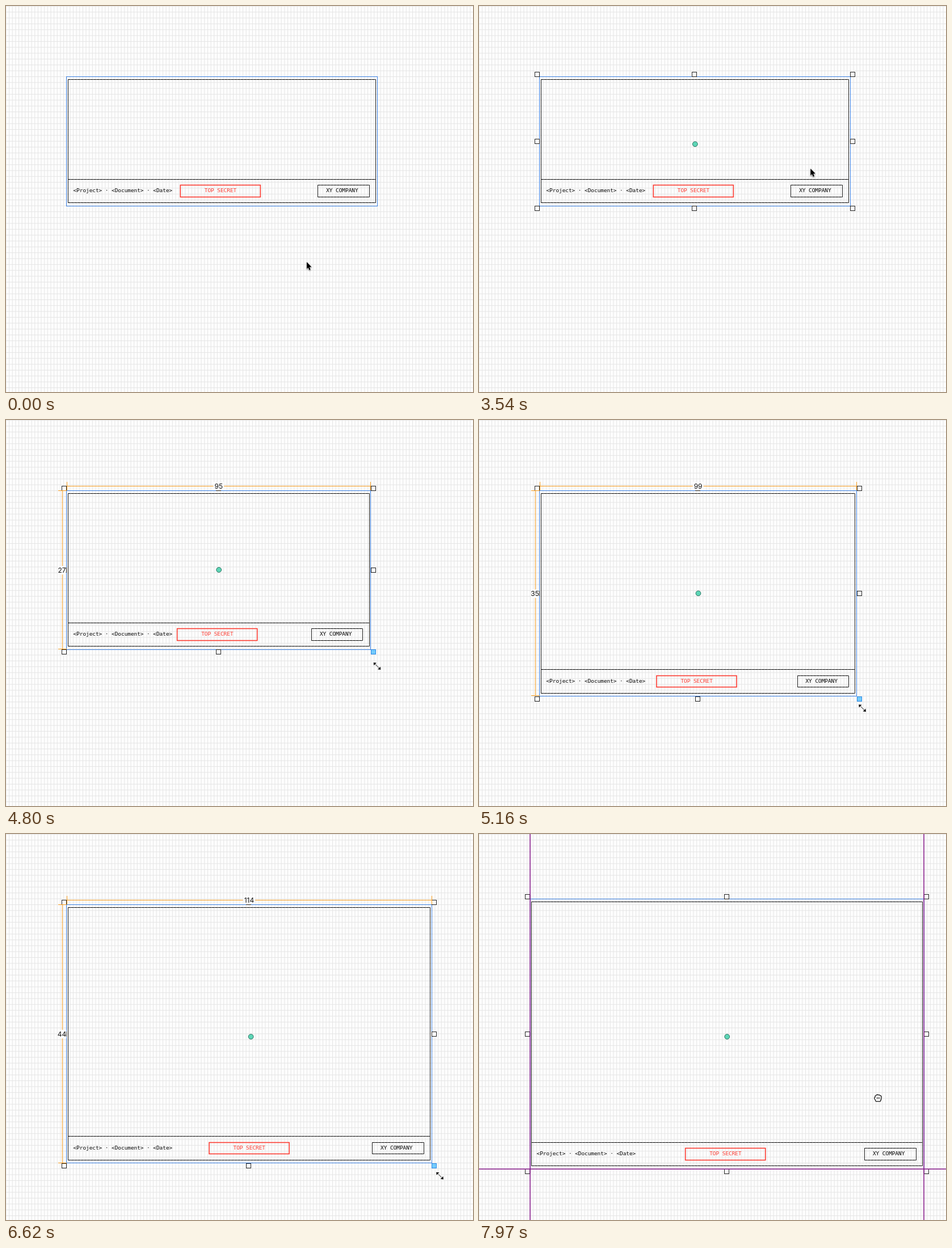
An HTML page with a canvas that plays this animation: 823x680 px, repeating every 8000 ms.

```html
<!DOCTYPE html>
<html lang="en">
<head>
<meta charset="utf-8">
<title>Resizing a text frame</title>
<style>
html, body { margin: 0; width: 100%; height: 100%; overflow: hidden; background: #fdfdfd; }
canvas { display: block; width: 823px; height: 680px; }
</style>
</head>
<body>
<canvas id="stage" width="823" height="680"></canvas>
<script>
const ctx = document.getElementById('stage').getContext('2d');
const WIDTH = 823, HEIGHT = 680, LOOP = 8000;
const CW = 5.642, CH = 10.34;
const HOME = { col: 19, row: 12, cols: 97, rows: 22 };
const BLUE = '#3a7fe0', ORANGE = '#f59a1c', RED = '#fb3a30', PURPLE = '#86188a';

// Moments in ms at which the interaction changes
const SELECT = 2830, HOVER = 3990, HOT = 4140, PRESS = 4350;
const RELEASE = 7360, LEAVE = 7400, GRAB = 7880;
const LAG = 100;

// Pointer moves: start, end, destination; it rests in between
const moves = [
  [0, 0, 529.5, 450], [500, 970, 489.5, 251], [2240, 2320, 503, 239.3],
  [2320, 2500, 515, 219.5], [3130, 3930, 649, 348], [3930, 3990, 657, 357],
  [PRESS, 4500, 636, 371.5], [4500, 5160, 675.5, 507.5], [5160, 5680, 719.5, 518],
  [5880, 6520, 754, 585], [6520, 6620, 764.5, 602], [6620, 7060, 806, 610],
  [RELEASE, 7730, 720, 475], [7850, 7970, 703, 465]
];

function pointerAt(t) {
  let x = 0, y = 0;
  for (const [from, to, toX, toY] of moves) {
    if (t < from) break;
    const p = Math.min(1, (t - from) / (to - from || 1));
    if (to === from) [x, y] = [toX, toY];
    else { x += (toX - x) * p; y += (toY - y) * p; }
  }
  return { x, y };
}

// Whole cells between two pointer positions
function cellsBetween(a, b) {
  return { x: Math.round((b.x - a.x - 0.5) / CW), y: Math.round((b.y - a.y) / CH) };
}

// The frame follows the corner drag with a short lag, then the body drag
function frameAt(t) {
  const pulled = cellsBetween(pointerAt(PRESS), pointerAt(Math.min(t, RELEASE) - LAG));
  const shift = t < GRAB ? { x: 0, y: 0 } : cellsBetween(pointerAt(7800), pointerAt(t));
  const resized = t >= PRESS;
  return {
    col: HOME.col + shift.x,
    row: HOME.row + shift.y,
    cols: HOME.cols + (resized ? pulled.x : 0),
    rows: HOME.rows + (resized ? pulled.y : 0)
  };
}

const pixel = v => Math.floor(v) + 0.5;

function line(x1, y1, x2, y2, color, width = 1) {
  ctx.strokeStyle = color;
  ctx.lineWidth = width;
  ctx.beginPath();
  ctx.moveTo(x1, y1);
  ctx.lineTo(x2, y2);
  ctx.stroke();
}

function polygon(points) {
  ctx.beginPath();
  points.forEach(([x, y]) => ctx.lineTo(x, y));
  ctx.closePath();
}

function drawGrid() {
  ctx.fillStyle = '#fdfdfd';
  ctx.fillRect(0, 0, WIDTH, HEIGHT);
  for (let x = 0; x < WIDTH; x += CW) line(x, 0, x, HEIGHT, '#e5e5e5');
  for (let y = 0.4; y < HEIGHT; y += CH) line(0, y, WIDTH, y, '#e5e5e5');
}

// Horizontal box-drawing strokes overlap at every cell
function rule(x1, x2, y) {
  line(x1, y, x2, y, '#333');
  ctx.setLineDash([3.64, 2]);
  line(x1, y, x2, y, '#000');
  ctx.setLineDash([]);
}

function cellBox(x1, y1, x2, y2) {
  rule(x1, x2, y1);
  rule(x1, x2, y2);
  line(x1, y1, x1, y2, '#1c1c1c');
  line(x2, y1, x2, y2, '#1c1c1c');
}

function drawContent({ col, row, cols, rows }) {
  const X = c => (col + c) * CW, Y = r => (row + r) * CH + 0.3;
  const edgeX = c => pixel(X(c) - 0.1), edgeY = r => pixel(Y(r));
  const top = edgeY(rows - 3.5), bottom = edgeY(rows - 1.5);
  cellBox(edgeX(0.5), edgeY(0.5), edgeX(cols - 0.5), edgeY(rows - 0.5));
  rule(edgeX(0.5), edgeX(cols - 0.5), edgeY(rows - 4.5));
  cellBox(edgeX(cols - 18.5), top, edgeX(cols - 2.5), bottom);

  const stamp = Math.floor((cols - 26) / 2);
  ctx.strokeStyle = RED;
  ctx.lineWidth = 1.6;
  ctx.strokeRect(X(stamp + 0.5) - 0.2, top, 25 * CW, bottom - top);

  ctx.font = `${CW / 0.602}px "DejaVu Sans Mono", monospace`;
  ctx.textAlign = 'left';
  ctx.textBaseline = 'alphabetic';
  const base = Math.floor(Y(rows - 3) + 7.8);
  ctx.fillStyle = '#000';
  ctx.fillText('<Project> · <Document> · <Date>', X(2), base);
  ctx.fillText('XY COMPANY', X(cols - 16), base);
  ctx.fillStyle = RED;
  ctx.fillText('TOP SECRET', X(stamp + 8), base);
}

function drawHandles(box, active) {
  const xs = [box.x1 - 4.5, box.midX - 0.9, box.x2 + 4.5];
  const ys = [box.y1 - 4.3, box.midY + 0.1, box.y2 + 4.3];
  ctx.lineWidth = 1;
  ys.forEach((y, j) => xs.forEach((x, i) => {
    if (i === 1 && j === 1) return;
    const hot = active && i === 2 && j === 2;
    const left = Math.round(x - 4.5) + 0.5, top = Math.round(y - 4.5) + 0.5;
    ctx.fillStyle = hot ? '#74cbfb' : '#fff';
    ctx.strokeStyle = hot ? '#2c8ae8' : '#222';
    ctx.fillRect(left, top, 8, 8);
    ctx.strokeRect(left, top, 8, 8);
  }));
}

function drawCentre({ col, row, cols, rows }) {
  const x = (col + Math.floor(cols / 2) + 0.5) * CW;
  const y = (row + Math.floor(rows / 2) + 0.5) * CH + 0.3;
  ctx.beginPath();
  ctx.arc(x, y, 4.4, 0, 7);
  ctx.fillStyle = '#5dd6b6';
  ctx.fill();
  ctx.strokeStyle = '#2b6f5f';
  ctx.lineWidth = 1;
  ctx.stroke();
}

function drawDimensions(box, { cols, rows }) {
  const x1 = pixel(box.x1 + 0.2), x2 = pixel(box.x2);
  const y1 = pixel(box.y1), y2 = pixel(box.y2 - 0.8);
  line(x1, 116.5, x2, 116.5, ORANGE);
  line(99.3, y1, 99.3, y2, ORANGE);
  for (const x of [x1, x2]) line(x, 109, x, 124, ORANGE);
  for (const y of [y1, y2]) line(92, y, 107, y, ORANGE);

  ctx.font = '12px Inter, sans-serif';
  ctx.textAlign = 'center';
  ctx.textBaseline = 'alphabetic';
  const label = (text, x, y, pad) => {
    const w = ctx.measureText(text).width + 2 * pad;
    ctx.fillStyle = '#fdfdfd';
    ctx.fillRect(x - w / 2, y - 7.5, w, 15);
    ctx.fillStyle = '#111';
    ctx.fillText(text, x, y + 4.4);
  };
  label(cols, box.midX - 0.2, 116.5, 2);
  label(rows, 98.5, box.midY + 0.2, 0);
}

function drawGuides(box) {
  for (const x of [box.x1, box.x2]) line(x, 0, x, HEIGHT, PURPLE, 1.5);
  line(0, box.y2, WIDTH, box.y2, PURPLE, 1.5);
}

function outlined(fill, edge, width) {
  ctx.lineJoin = 'round';
  ctx.strokeStyle = edge;
  ctx.lineWidth = width;
  ctx.stroke();
  ctx.fillStyle = fill;
  ctx.fill();
}

function drawArrow() {
  polygon([[0.5, 1], [0.5, 13], [3.1, 10.6], [5.1, 15.2], [7.1, 14.3], [5.2, 9.9], [8.8, 9.6]]);
  ctx.shadowColor = 'rgba(0,0,0,.35)';
  ctx.shadowBlur = 2;
  ctx.shadowOffsetY = 1;
  outlined('#000', '#fff', 1.4);
}

function drawResize() {
  ctx.rotate(Math.PI / 4);
  line(-6, 0, 6, 0, '#fff', 3);
  line(-6, 0, 6, 0, '#666', 1.2);
  for (const side of [-1, 1]) {
    polygon([[9 * side, 0], [4.8 * side, -3.4], [4.8 * side, 3.4]]);
    outlined('#111', '#fff', 1.2);
  }
}

function drawFist() {
  ctx.beginPath();
  ctx.moveTo(-3.2, 5.4);
  ctx.quadraticCurveTo(-4, 3, -5.2, 1.2);
  ctx.quadraticCurveTo(-6.2, -1, -4, -1);
  ctx.quadraticCurveTo(-5, -4.2, -2.6, -4.2);
  ctx.quadraticCurveTo(-0.8, -5.8, 0.6, -4.4);
  ctx.quadraticCurveTo(2.4, -5.4, 3.2, -3.8);
  ctx.quadraticCurveTo(5.8, -4, 5.4, -0.8);
  ctx.quadraticCurveTo(5.4, 2.2, 3.8, 5.4);
  ctx.closePath();
  outlined('#fff', '#111', 2.6);
  for (const x of [-1.6, 0.6, 2.8]) line(x, -1.4, x, 1.8, '#222', 1);
}

function drawPointer(t) {
  const { x, y } = pointerAt(t);
  ctx.save();
  ctx.translate(x, y);
  if (t >= GRAB) drawFist();
  else if (t >= HOVER && t < LEAVE) drawResize();
  else drawArrow();
  ctx.restore();
}

function drawScene(t) {
  const frame = frameAt(t);
  const box = {
    x1: frame.col * CW - 0.2, x2: (frame.col + frame.cols) * CW - 0.2,
    y1: frame.row * CH + 0.8, y2: (frame.row + frame.rows) * CH + 0.8
  };
  box.midX = (box.x1 + box.x2) / 2;
  box.midY = (box.y1 + box.y2) / 2;
  const selected = t >= SELECT;

  drawGrid();
  drawContent(frame);
  const left = pixel(box.x1), top = pixel(box.y1);
  ctx.strokeStyle = BLUE;
  ctx.lineWidth = 1;
  ctx.strokeRect(left, top, pixel(box.x2) - left, pixel(box.y2) - top);
  if (selected) drawHandles(box, t >= HOT && t < RELEASE);
  if (t >= PRESS && t < RELEASE) drawDimensions(box, frame);
  if (selected) drawCentre(frame);
  if (frame.row < HOME.row) drawGuides(box);
  drawPointer(t);
}

const start = performance.now();
function tick() {
  drawScene((performance.now() - start) % LOOP);
  requestAnimationFrame(tick);
}
tick();
</script>
</body>
</html>
```
